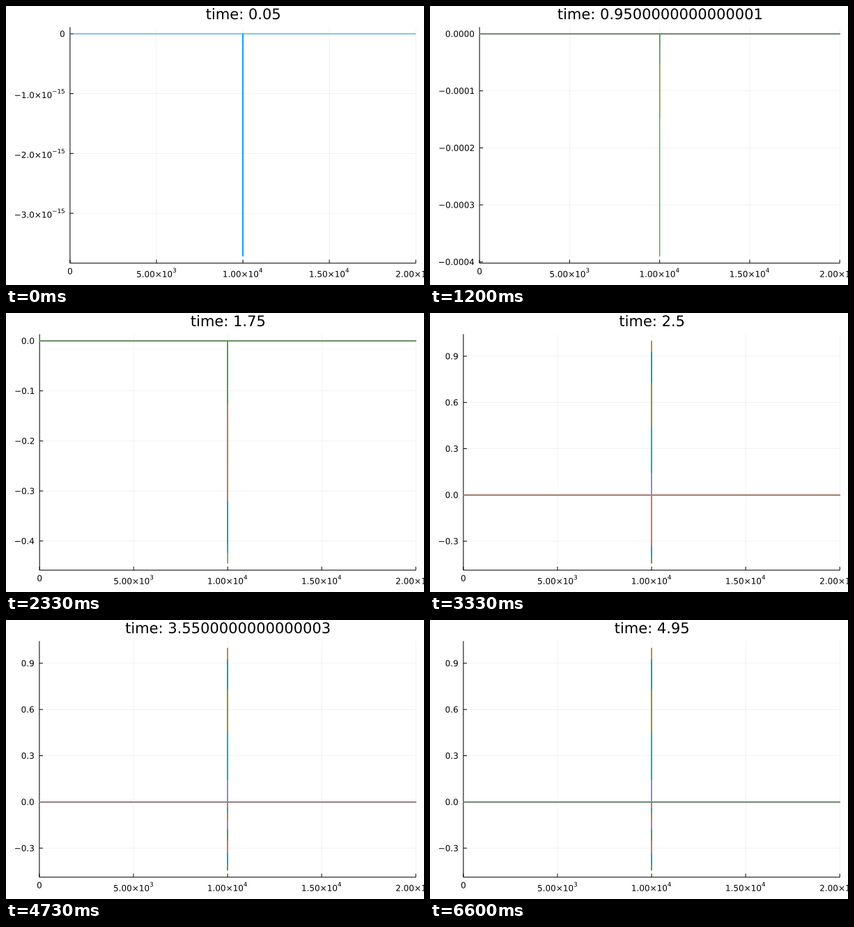
Animation, 600 px wide and 400 px high, one loop 6.67 s. Source, as a matplotlib script:

```python
import math

import matplotlib.pyplot as plt
import numpy as np
from matplotlib.animation import FuncAnimation
from matplotlib.collections import LineCollection
from matplotlib.patches import PathPatch
from matplotlib.path import Path
from matplotlib.textpath import TextPath

plt.rcParams["font.family"] = "DejaVu Sans"

W, H, DPI = 600, 400, 100
FRAMES, DT = 100, 0.05
TOP, BOTTOM, RIGHT = 30.3, 368.7, 588.2
PX = 72 / DPI
TICK_LEN = 5
SMALL, LARGE, SUP = 12, 21, 0.73
X_MAX = 20000
X_TICKS = [i * 5000 for i in range(5)]
PALETTE = [
    "#009afa", "#e36f47", "#3ea44e", "#c371d2",
    "#ac8e18", "#00aaae", "#ed5e93", "#c68225",
    "#00a98d", "#8e971e", "#00a9cc", "#9b7fe9",
    "#618df6", "#f06073", "#dd65b6", "#6c9f33",
]


def ricker(t):
    """Wavelet of peak frequency 1, centred on t = 2."""
    a2 = (math.pi * (t - 2)) ** 2
    return (1 - 2 * a2) * math.exp(-a2)


TIMES = [DT * (k + 1) for k in range(FRAMES)]
PULSE = np.array([ricker(t) for t in TIMES])


def nice_ticks(lo, hi):
    """Best scoring 4 to 8 round values between lo and hi."""
    span = hi - lo
    order = math.floor(math.log10(span))
    best, ticks = -math.inf, []
    for z in range(order - 2, order + 1):
        for q, nice in ((1, 1), (5, 0.9), (2, 0.7), (2.5, 0.5), (3, 0.2)):
            step = q * 10.0 ** z
            first, last = math.ceil(lo / step), math.floor(hi / step)
            n = last - first + 1
            if not 4 <= n <= 8:
                continue
            grain = 1 - abs(n - 5) / 5
            cover = 1.5 * span / ((n - 1) * step)
            zero = first <= 0 <= last
            score = grain / 4 + zero / 6 + cover / 3 + nice / 4
            if score > best:
                best = score
                ticks = [i * step for i in range(first, last + 1)]
    return ticks


def decimals(values):
    d = 0
    while d < 9 and any(abs(v * 10 ** d - round(v * 10 ** d)) > 1e-4 for v in values):
        d += 1
    return d


def tick_labels(values):
    """Pairs of (text, exponent); exponent is empty for plain numbers."""
    if abs(math.log10(values[-1] - values[0])) <= 4:
        d = decimals(values)
        pairs = [(f"{v:.{d}f}", "") for v in values]
    else:
        parts = [f"{v:.6e}".split("e") for v in values]
        d = decimals([float(m) for m, _ in parts]) + 1
        pairs = [(f"{float(m):.{d}f}×10", str(int(e))) if v else ("0", "")
                 for v, (m, e) in zip(values, parts)]
    return [(a.replace("-", "−"), b.replace("-", "−")) for a, b in pairs]


class Label:
    """Outlined text with an optional exponent, and its ink box."""

    cache = {}

    def __init__(self, text, exponent="", size=SMALL):
        self.xy, self.codes = self.outline(text, size)
        if exponent:
            xy, codes = self.outline(exponent, size * SUP)
            xy = xy + [self.ink()[1][0] + 0.8, -6.6]
            self.xy = np.vstack([self.xy, xy])
            self.codes = np.concatenate([self.codes, codes])
        (self.x0, self.y0), (self.x1, self.y1) = self.ink()
        self.width = self.x1 - self.x0
        self.cx, self.cy = (self.x0 + self.x1) / 2, (self.y0 + self.y1) / 2

    @staticmethod
    def outline(text, size):
        p = TextPath((0, 0), text, size=size)
        return p.vertices * [1, -1], p.codes

    def ink(self):
        pts = self.xy[self.codes != Path.CLOSEPOLY]
        return pts.min(axis=0), pts.max(axis=0)

    @classmethod
    def get(cls, *key):
        if key not in cls.cache:
            cls.cache[key] = cls(*key)
        return cls.cache[key]


def join(placed):
    """One path from (label, dx, dy) triples."""
    return Path(np.vstack([p.xy + [dx, dy] for p, dx, dy in placed]),
                np.concatenate([p.codes for p, _, _ in placed]))


fig = plt.figure(figsize=(W / DPI, H / DPI), dpi=DPI, facecolor="white")
ax = fig.add_axes([0, 0, 1, 1])
ax.set_xlim(0, W)
ax.set_ylim(H, 0)
ax.axis("off")


def line_layer(width, z, **kw):
    layer = LineCollection([], linewidths=width * PX, zorder=z, **kw)
    layer.set_snap(False)
    layer.set_joinstyle("bevel")
    ax.add_collection(layer, autolim=False)
    return layer


grid = line_layer(0.5, 1, colors=[(0, 0, 0, 0.1)])
frame_lines = line_layer(1, 2, colors="black")
curves = line_layer(1, 3)
words = PathPatch(Path([(0, 0)]), facecolor="black", edgecolor="none", zorder=4)
words.set_snap(False)
ax.add_artist(words)

X_LABELS = [Label.get(*pair) for pair in tick_labels(X_TICKS)]


def draw(k):
    values = PULSE[:k + 1]
    lo, hi = min(values.min(), 0.0), max(values.max(), 0.0)
    pad = 0.03 * (hi - lo)
    lo, hi = lo - pad, hi + pad

    ticks = nice_ticks(lo, hi)
    labels = [Label.get(*pair) for pair in tick_labels(ticks)]
    left = 21 + max(p.width for p in labels)

    def sx(x):
        return left + (RIGHT - left) * x / X_MAX

    def sy(y):
        return TOP + (BOTTOM - TOP) * (hi - y) / (hi - lo)

    xs, ys = [sx(x) for x in X_TICKS], [sy(y) for y in ticks]
    grid.set_segments([[(x, TOP), (x, BOTTOM)] for x in xs]
                      + [[(left, y), (RIGHT, y)] for y in ys])
    frame_lines.set_segments([[(left, TOP), (left, BOTTOM)],
                              [(left, BOTTOM), (RIGHT, BOTTOM)]]
                             + [[(x, BOTTOM), (x, BOTTOM - TICK_LEN)] for x in xs]
                             + [[(left, y), (left + TICK_LEN, y)] for y in ys])

    mid, zero = X_MAX // 2, sy(0)
    curves.set_segments([[(left, zero), (sx(mid - 1), zero), (sx(mid), sy(v)),
                          (sx(mid + 1), zero), (RIGHT, zero)] for v in values])
    curves.set_color([PALETTE[i % len(PALETTE)] for i in range(k + 1)])

    title = Label.get(f"time: {TIMES[k]}", "", LARGE)
    words.set_path(join(
        [(title, (left + RIGHT) / 2 - title.cx, 18.9)]
        + [(p, x - p.cx, 375.6 - p.y0) for p, x in zip(X_LABELS, xs)]
        + [(p, left - 8 - p.x1, y - p.cy) for p, y in zip(labels, ys)]))
    return grid, frame_lines, curves, words


anim = FuncAnimation(fig, draw, frames=FRAMES, interval=66.7,
                     init_func=lambda: draw(0), repeat=True, repeat_delay=0)
plt.show()
```
